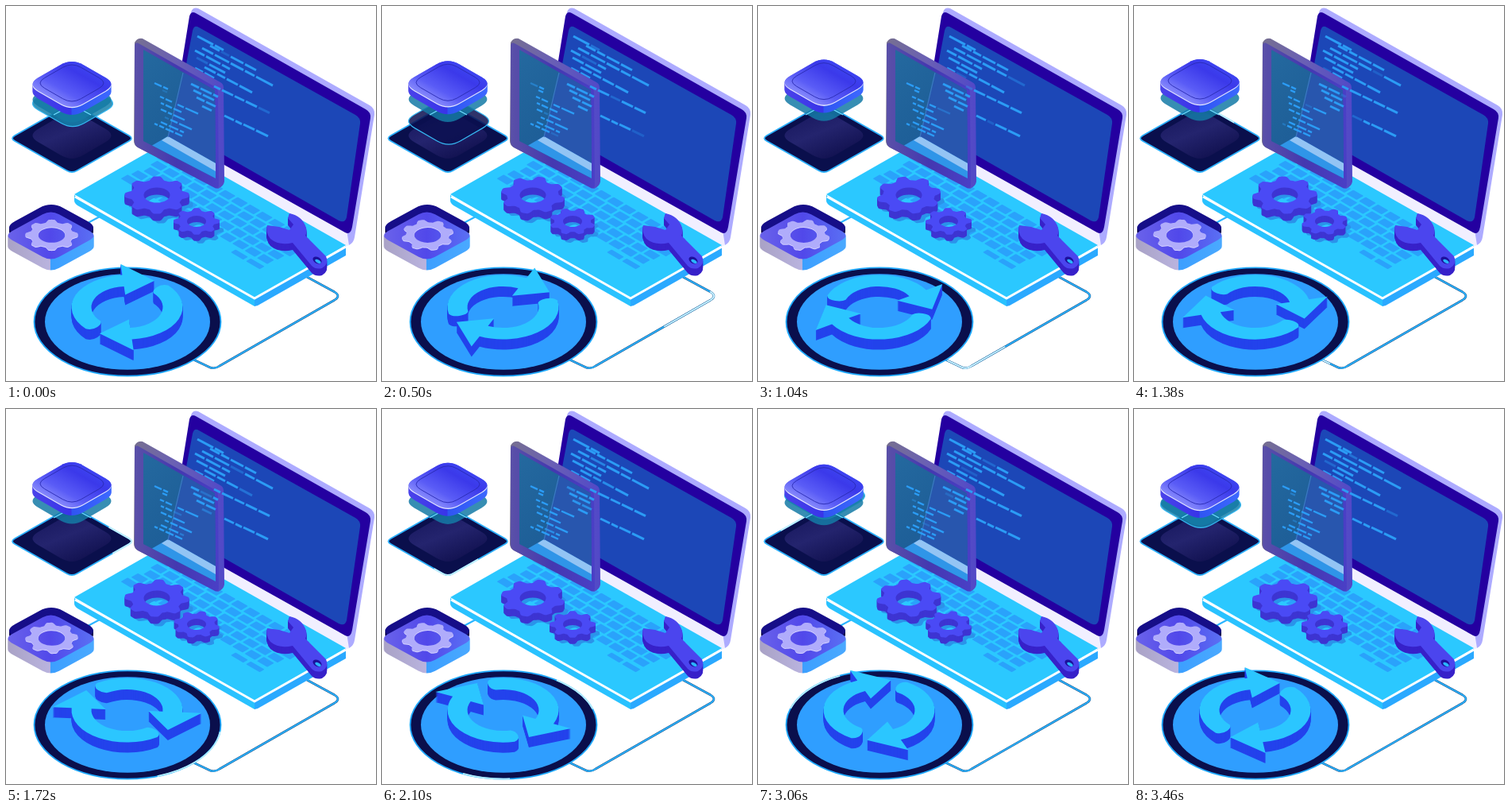
An HTML page for the animation above (3500 ms loop, 466 px wide and 472 px high).

```html
<!DOCTYPE html>
<html lang="en">
<head>
<meta charset="utf-8">
<title>System update</title>
<style>
  html, body { margin: 0; width: 100%; height: 100%; overflow: hidden; background: #fff; }
  svg { display: block; width: 466px; height: 472px; }
</style>
</head>
<body>
<svg id="stage" viewBox="0 0 466 472" xmlns="http://www.w3.org/2000/svg"></svg>
<script>
const NS = 'http://www.w3.org/2000/svg';
const stage = document.getElementById('stage');
const TILT = 0.58;

function add(parent, tag, attrs) {
  const el = document.createElementNS(NS, tag);
  for (const key in attrs) el.setAttribute(key, attrs[key]);
  parent.appendChild(el);
  return el;
}
const group = (parent = stage) => add(parent, 'g', {});
const shape = (d, fill, parent = stage, extra = {}) => add(parent, 'path', { d, fill, ...extra });
const line = (d, stroke, width, parent = stage, extra = {}) =>
  add(parent, 'path', { d, fill: 'none', stroke, 'stroke-width': width, 'stroke-linejoin': 'round', ...extra });
const ellipse = (cx, cy, rx, fill, extra = {}) =>
  add(stage, 'ellipse', { cx, cy, rx, ry: rx * TILT, fill, ...extra });
const shift = (el, dy) => el.setAttribute('transform', `translate(0 ${dy})`);
const show = (el, on) => el.setAttribute('visibility', on ? 'visible' : 'hidden');

const defs = add(stage, 'defs', {});
function gradient(id, stops, x2 = 1, y2 = 0, y1 = 0) {
  const g = add(defs, 'linearGradient', { id, x2, y2, y1 });
  for (const [offset, color] of stops) add(g, 'stop', { offset, 'stop-color': color });
  return `url(#${id})`;
}

// Isometric tile whose rounded corners reach exactly rx and ry from the centre
function diamond(cx, cy, rx, ry, k) {
  const corners = [[0, -1], [1, 0], [0, 1], [-1, 0]];
  const grow = 1 / (1 - k / 4);
  const at = (x, y) => `${cx + x * rx * grow},${cy + y * ry * grow}`;
  const mix = (a, b, t) => at(a[0] + (b[0] - a[0]) * t, a[1] + (b[1] - a[1]) * t);
  return corners.map((c, i) => {
    const prev = corners[(i + 3) % 4], next = corners[(i + 1) % 4];
    return `${i ? 'L' : 'M'}${mix(c, prev, k / 2)} Q${at(...c)} ${mix(c, next, k / 2)}`;
  }).join(' ') + 'Z';
}

// Stack of copies giving a flat shape its height
function extrude(parent, d, height, side, top) {
  const paint = (fill, dy) => shape(d, fill, parent, { transform: `translate(0 ${dy})` });
  for (let dy = height; dy > 0; dy--) paint(side, dy);
  paint(top, 0);
}

// Solid lying on the ground plane that can turn about its centre
function spinner(parent, cx, cy, height, d, side, top) {
  const layers = [];
  for (let dy = height; dy >= 0; dy--)
    layers.push([dy, shape(d, dy ? side : top, parent, { 'fill-rule': 'evenodd' })]);
  return angle => layers.forEach(([dy, el]) =>
    el.setAttribute('transform', `translate(${cx} ${cy + dy}) scale(1 ${TILT}) rotate(${angle})`));
}

function polar(r, degrees) {
  const a = degrees * Math.PI / 180;
  return `${(r * Math.cos(a)).toFixed(2)},${(r * Math.sin(a)).toFixed(2)}`;
}

function gearPath(outer, depth, hole) {
  const points = [];
  for (let deg = 0; deg < 360; deg += 2.5) {
    const tooth = Math.max(-1, Math.min(1, 1.6 * Math.cos(8 * deg * Math.PI / 180)));
    points.push(polar(outer - depth * (1 - tooth) / 2, deg));
  }
  return `M${points.join('L')}ZM${hole},0A${hole},${hole} 0 1 0 ${-hole},0A${hole},${hole} 0 1 0 ${hole},0Z`;
}

// Cable to the disc
const cable = 'M379,341 L414,360 Q422,365 414,370 L269,453 Q262,458 255,454 L236,445';
line(cable, '#0c4a86', 2.6);
line(cable, '#2bb4ff', 1.7);
const cablePulse = line(cable, '#d5f6ff', 1.7, stage, { pathLength: 100, 'stroke-dasharray': '32 300' });
line('M92,279 L120,264', '#2bb4ff', 2);

// Laptop lid
shape('M233,8 Q235,1 242,3 L458,125 Q465,129 464,137 L439,291 Q438,298 432,301 L208,175 Z', '#adabff');
shape('M209,160 L429,282 L432,301 L420,306 L204,180 Z', '#f1efff');
shape('M231,13 Q233,6 239,9 L453,130 Q460,134 459,141 L436,278 Q434,289 427,285 L207,162 Z', '#2400a0');
shape('M235,31 Q237,23 243,27 L440,137 Q447,141 446,148 L429,266 Q427,274 419,270 L212,152 Z', '#1c47b7');

// Laptop base
shape('M86,238 L313,368 V378 L90,251 Q86,248 86,245Z', '#29c2ff');
shape('M313,368 L428,302 V314 L317,377 L313,378Z', '#2aa9ff');
shape('M86,237 L200,172 L428,301 L313,368Z', '#2bc8ff');
line('M87,240 L313,368 L428,303', '#ffffff', 3);

// Keyboard
const keys = add(stage, 'g', { transform: 'matrix(.866 .504 -.866 .504 200 171)', fill: '#2aa2fb' });
const key = (x, y, width, height = 10) => add(keys, 'rect', { x, y, width, height, rx: 1 });
for (let row = 0; row < 5; row++) {
  const stagger = [0, 4, 7, 2, 0][row];
  for (let col = 0; col < 12; col++) {
    if (row === 4 && col > 3 && col < 8) continue;
    key(14 + stagger + col * 18, 16 + row * 13, 15);
  }
}
key(86, 68, 69);
key(186, 83, 18, 7);
key(208, 83, 20, 7);

// Code on the screens: x, y and dash lengths
const segments = [];
function codeRows(parent, rows, slope, width) {
  const first = segments.length;
  for (const [x0, y0, ...dashes] of rows) {
    let x = x0;
    for (const length of dashes) {
      const y = y0 + (x - x0) * slope;
      segments.push({ el: line(`M${x},${y} l${length},${length * slope}`, '#2b9cf5', width, parent) });
      x += length + 2;
    }
  }
  const last = segments.length - 1;
  for (let i = first; i <= last; i++) segments[i].dimAt = (10 + 5.5 * (last - i)) % 60;
}
codeRows(group(), [
  [241, 38, 20, 11],
  [257, 50, 12, 10, 16, 14],
  [247, 53, 14, 18, 16, 12, 21],
  [238, 56, 12, 18, 10],
  [240, 65, 14, 20],
  [250, 77, 14, 10, 14, 16],
  [238, 78, 10, 12],
  [239, 86, 12, 16]
], 0.53, 3);

// Tablet
const rim = gradient('rim', [[0, '#77708f'], [0.45, '#6a60b4'], [1, '#5148c8']]);
const frame = gradient('frame', [[0, '#5a50a8'], [0.5, '#4438b0'], [1, '#4a3fc6']]);
const glass = gradient('glass', [[0, '#24699f'], [0.6, '#1e5f98'], [1, '#225aa4']], 0.6, 1);
shape('M162,46 Q165,40 172,41 L270,96 Q274,98 274,103 L275,221 Q274,227 267,230 L166,178 Q161,175 161,170Z', rim);
shape('M162,49 Q163,45 167,47 L262,101 Q267,104 267,109 L268,226 Q267,231 263,229 L166,178 Q162,175 162,171Z', frame);
shape('M173,55 L263,106 L264,217 L173,170Z', glass);
shape('M224,84 L263,106 L264,199 L204,165Z', '#2856ae');
shape('M204,164 L264,198 V217 L184,175.500Z', '#2f95e8');
shape('M204,164 L264,198 V208 L196,169Z', '#93c4f4');
line('M223,84 L204,165', '#3b78c4', 1.2);
codeRows(group(), [
  [233, 98, 10, 14, 6],
  [262, 101, 8, 14, 12, 14, 14],
  [236, 106, 10, 14],
  [240, 115, 10, 12],
  [247, 126, 12],
  [275, 138, 12, 8],
  [299, 149, 14, 15]
], 0.48, 3);
codeRows(group(), [
  [187, 97, 9, 6],
  [197, 106, 6],
  [194, 114, 5, 8],
  [195, 122, 4, 8, 10],
  [216, 124, 8, 16],
  [195, 130, 7, 5, 14],
  [200, 140, 5, 9, 16],
  [195, 146, 8, 12, 5],
  [187, 148, 4, 6, 10, 9]
], 0.45, 2.4);

// Wrench
const wrench = 'M357,261 Q373,264 378,279 Q379,285 377,289 L403,315 Q407,325 398,330 Q390,332 385,327 ' +
  'L361,298 Q344,302 333,293 Q326,284 329,276 L344,278 L357,282 L362,275 L355,267Z';
extrude(group(), wrench, 9, '#3721c9', '#4b45ee');
add(stage, 'ellipse', { cx: 392, cy: 320, rx: 6, ry: 4, fill: '#1d109c', transform: 'rotate(30 392 320)' });
add(stage, 'ellipse', { cx: 393, cy: 321.5, rx: 4, ry: 2, fill: '#2bb4ff', transform: 'rotate(30 393 321.500)' });

// Gears on the keyboard, each with its shadow
function keyboardGear(cx, cy, height, path) {
  const shadow = spinner(group(), cx + 5, cy + height + 3, 0, path, '', '#2a93ea');
  const gear = spinner(group(), cx, cy, height, path, '#3d34d2', '#4a4af5');
  return angle => { shadow(angle); gear(angle); };
}
const bigGear = keyboardGear(190, 238, 9, gearPath(40.5, 8, 16.5));
const smallGear = keyboardGear(240, 271, 8, gearPath(29, 6, 12));

// Gear tile
const tileSide = gradient('tileSide', [[0, '#a9a2c6'], [0.49, '#b9b3de'], [0.5, '#3c9fff'], [1, '#4aa9ff']]);
const tileTop = gradient('tileTop', [[0, '#6a62ea'], [0.5, '#5148ea'], [1, '#5a70f4']]);
extrude(group(), diamond(57, 279, 53, 29, 0.5), 5, '#10094f', '#160e88');
extrude(group(), diamond(56.5, 289, 54, 29.5, 0.35), 14, tileSide, tileTop);
const tileGear = spinner(group(), 57.5, 288, 1, gearPath(33, 6, 17), '#d5d2ff', '#b0acfb');

// Plate and floating block
const plate = diamond(83, 166.5, 75, 42.5, 0.16);
const slabTop = gradient('slabTop', [[0, '#16165c'], [0.5, '#24246e'], [1, '#10104e']], 0.7, 1);
shape(plate, '#0a0f4c');
line(plate, '#2bb0ff', 1.8);
const platePulse = line(plate, '#c4f2ff', 1.8, stage, { pathLength: 100, 'stroke-dasharray': '18 300' });
shape(diamond(83, 163, 49.5, 29, 0.5), slabTop);

// Scanner sheet dropping from the block to the plate
const sheetPath = diamond(84, 0, 50.5, 29, 0.5);
const sheet = group();
const sheetFill = shape(sheetPath, '#0b1050', sheet);
line(sheetPath, '#35b8f2', 1.2, sheet);
const glow = shape(diamond(83, 116, 49.5, 28.5, 0.5), '#147ba6', stage, { opacity: 0.85 });
line('M60,137 L72,130.500 M95,130.500 L107,137', '#6fdcff', 1.4);

const block = group();
const blockSide = gradient('blockSide', [[0, '#4a42ea'], [0.49, '#3834e8'], [0.5, '#2f55f2'], [1, '#3d68ff']]);
const blockTop = gradient('blockTop', [[0, '#a3a6ff'], [0.35, '#5a5cf6'], [0.7, '#3b39ea'], [1, '#3f4cf6']], 0.8, 0, 0.8);
const blockFace = diamond(83, 98.5, 49.5, 28.5, 0.5);
extrude(block, blockFace, 10, blockSide, blockTop);
shape(blockFace, '#e4e6ff', block, { transform: 'translate(0 1.300)' });
shape(blockFace, blockTop, block);
line(diamond(83, 97, 40, 23, 0.5), '#2a2bb4', 0.9, block);

// Disc
ellipse(153, 397.5, 117.5, '#0a0f4c', { stroke: '#1fa9ff', 'stroke-width': 1.8 });
const discPulses = [0, 1].map(side =>
  line(`M238,444.600 A117.500,68.150 0 0 ${side} 68,350.400`, '#b5eeff', 1.8, stage,
    { pathLength: 100, 'stroke-dasharray': '20 300' }));
ellipse(153, 397.5, 104, '#2f9eff');

// Pair of chasing arrows
const half = turn => [
  `M${polar(70, turn - 222)}`, `A70,70 0 0 1 ${polar(70, turn - 95)}`,
  `L${polar(94, turn - 95)}`, `L${polar(67, turn - 59)}`, `L${polar(27, turn - 95)}`,
  `L${polar(45, turn - 95)}`, `A45,45 0 0 0 ${polar(45, turn - 222)}`,
  `Q${polar(48, turn - 229)} ${polar(57, turn - 229)}`,
  `Q${polar(67, turn - 229)} ${polar(70, turn - 222)}Z`
].join(' ');
const arrows = spinner(group(), 152.5, 379, 13, half(0) + half(180), '#2342ec', '#2bc6ff');

// Sixty steps of 40 ms; some rest for another 100 ms
const LOOP = 3500, STEPS = 60;
const rests = new Set([0, 10, 21, 29, 37, 42, 43, 45, 48, 56, 58]);
function stepAt(ms) {
  let end = 0;
  for (let i = 0; i < STEPS; i++) {
    end += rests.has(i) ? 140 : 40;
    if (ms < end) return i;
  }
  return STEPS - 1;
}

function sweep(el, step, from, to, size) {
  const u = (step - from) / (to - from);
  show(el, u > 0 && u < 1);
  el.setAttribute('stroke-dashoffset', size - u * (100 + size));
}

function draw(step) {
  arrows(step * 3);
  bigGear(step * 1.5);
  smallGear(-step * 2.25);
  tileGear(-step * 1.5);

  const lift = 1.5 * (1 - Math.cos(2 * Math.PI * step / STEPS));
  shift(block, -lift);
  shift(glow, 2 - lift * 0.7);

  const fall = ((step + 7) % STEPS) / 25;
  show(sheet, fall < 1);
  shift(sheet, 107 + fall * 56);
  sheetFill.setAttribute('fill', fall < 0.45 ? '#1580ab' : '#0b1050');
  sheetFill.setAttribute('opacity', 0.85);

  sweep(cablePulse, step, 0, 28, 32);
  discPulses.forEach(p => sweep(p, step, 29, 57, 20));
  sweep(platePulse, step, 22, 59, 18);

  for (const { el, dimAt } of segments) {
    const gap = Math.abs(step - dimAt);
    const near = Math.min(gap, STEPS - gap);
    el.setAttribute('opacity', Math.min(1, 0.3 + near * 0.2));
  }
}

function tick(now) {
  draw(stepAt(now % LOOP));
  requestAnimationFrame(tick);
}
draw(0);
requestAnimationFrame(tick);
</script>
</body>
</html>
```
